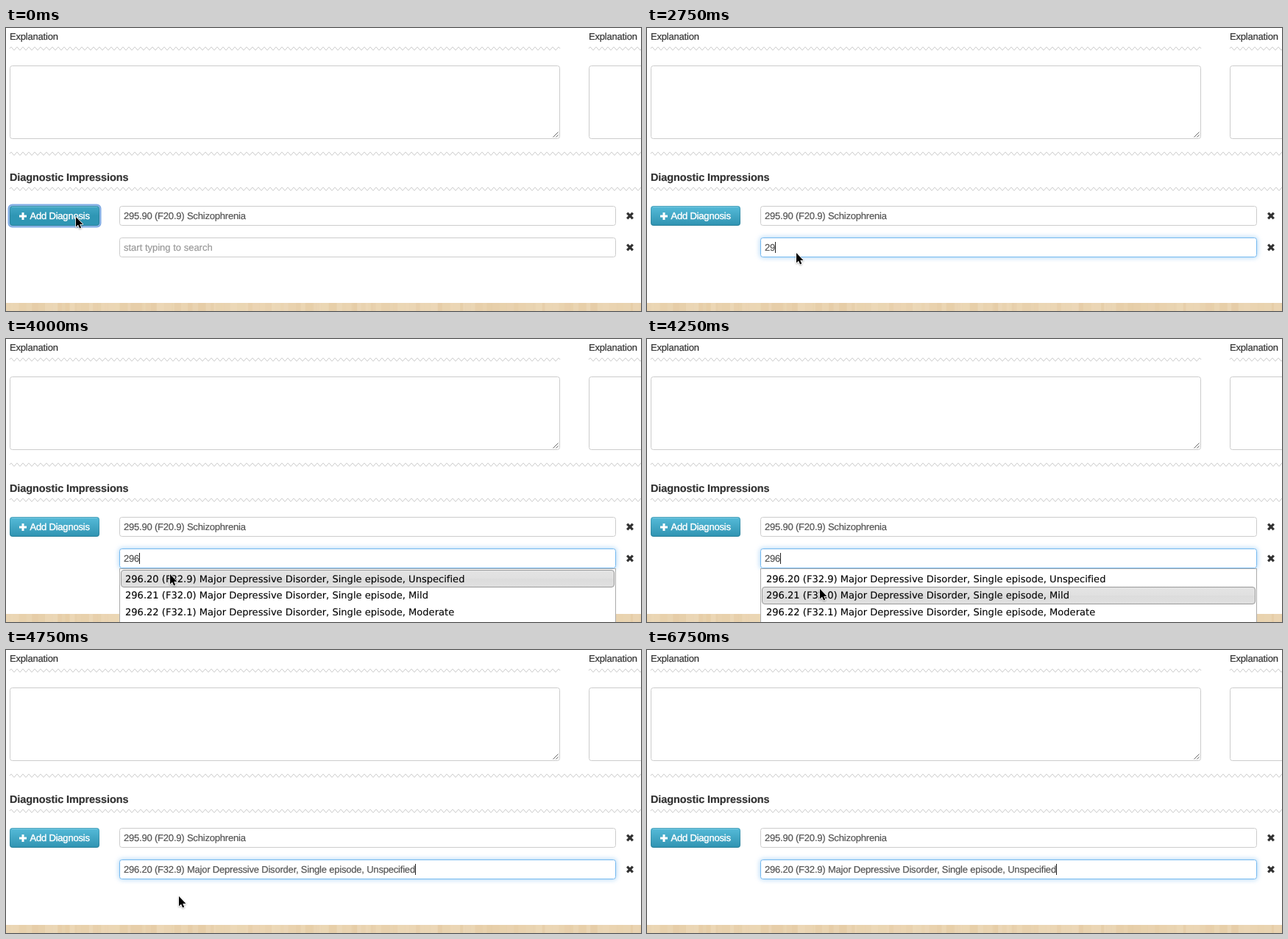
These frames come from a looping animation (863x385 px, 7250 ms). An HTML page:

```html
<!DOCTYPE html>
<html lang="en">
<head>
<meta charset="utf-8">
<title>Diagnosis search</title>
<style>
html, body { margin: 0; width: 100%; height: 100%; overflow: hidden; background: #fff; }
svg { display: block; }
text { font: 13px "Liberation Sans", Arial, sans-serif; letter-spacing: -.2px; fill: #333; stroke: #333; stroke-width: .2px; text-rendering: geometricPrecision; white-space: pre; }
.field { fill: #fff; stroke: #ccc; }
.value { fill: #555; stroke: #555; }
.hint { fill: #999; stroke: #999; letter-spacing: 0; }
.head { font-size: 14.5px; font-weight: bold; letter-spacing: -.1px; }
.label { fill: #fff; stroke: #fff; stroke-width: .4px; }
#list text { font: 13px "DejaVu Sans", Verdana, sans-serif; letter-spacing: .03px; fill: #000; stroke: #000; stroke-width: .1px; }
#glow { fill: #52a8ec; filter: blur(3.5px); }
#cursor { filter: drop-shadow(0 1px 1px rgba(0, 0, 0, .3)); }
</style>
</head>
<body>
<svg width="863" height="385" viewBox="0 0 863 385">
  <defs>
    <linearGradient id="normal" x2="0" y2="1"><stop stop-color="#56bbd9"/><stop offset="1" stop-color="#2f93b1"/></linearGradient>
    <linearGradient id="over" x2="0" y2="1"><stop stop-color="#43a9c7"/><stop offset=".5" stop-color="#2f96b4"/></linearGradient>
    <linearGradient id="pick" x2="0" y2="1"><stop stop-color="#e4e4e4"/><stop offset=".5" stop-color="#e0e0e0"/><stop offset=".5" stop-color="#dcdcdc"/><stop offset="1" stop-color="#e0e0e0"/></linearGradient>
  </defs>
  <g id="wood"><rect y="374" width="863" height="11" fill="#e9d3b0"/></g>
  <path id="waves" fill="none" stroke="#ccc"/>
  <text x="5" y="16">Explanation</text>
  <text x="792" y="16">Explanation</text>
  <rect class="field" x="5.5" y="51.5" width="747" height="99" rx="3"/>
  <rect class="field" x="792.5" y="51.5" width="747" height="99" rx="3"/>
  <path d="M743.5 148.5l7-7M747.5 148.5l3-3" stroke="#666"/>
  <text class="head" x="5" y="208">Diagnostic Impressions</text>

  <rect id="ring" x="3.5" y="240.5" width="125" height="30" rx="5" fill="#a9c8ee" stroke="#7fabe3" stroke-width="2"/>
  <rect id="button" x="5" y="242" width="122" height="27" rx="4"/>
  <rect x="5.5" y="242.5" width="121" height="26" rx="3.5" fill="none" stroke="#000" stroke-opacity=".13"/>
  <path d="M8 243.5h116" stroke="#fff" stroke-opacity=".2"/>
  <path d="M18 256h10M23 251v10" stroke="#fff" stroke-width="3"/>
  <text class="label" x="32.5" y="260">Add Diagnosis</text>

  <rect class="field" x="154.5" y="242.5" width="674" height="26" rx="3"/>
  <text class="value" x="160" y="260">295.90 (F20.9) Schizophrenia</text>
  <rect id="glow" x="154" y="285" width="675" height="27" rx="3"/>
  <rect id="input" class="field" x="154.5" y="285.5" width="674" height="26" rx="3"/>
  <text id="hint" class="hint" x="160" y="303">start typing to search</text>
  <text id="value" class="value" x="160" y="303"></text>
  <rect id="caret" y="291" width="1" height="15" fill="#222"/>
  <path d="M844.2 251.7l7.6 7.6m0-7.6l-7.6 7.6M844.2 294.7l7.6 7.6m0-7.6l-7.6 7.6" stroke="#333" stroke-width="3.3"/>

  <g id="list">
    <rect id="panel" x="154.5" y="312.5" height="120" fill="#fff" stroke="#aaa"/>
    <rect id="mark" x="156.5" width="670" height="23" rx="3.5" fill="url(#pick)" stroke="#999"/>
    <text x="162" y="331"></text>
    <text x="162" y="353"></text>
    <text x="162" y="376"></text>
  </g>
  <path id="cursor" d="M1 2V15.5L4 12.8 6.1 17.4 8.2 16.5 6.2 12H10.4Z" stroke="#fff" stroke-width="1.6" stroke-linejoin="round" paint-order="stroke"/>
</svg>
<script>
const $ = id => document.getElementById(id);
const set = (el, attrs) => { for (const k in attrs) el.setAttribute(k, attrs[k]); };
const show = (el, on) => { el.style.display = on ? '' : 'none'; };

const LOOP = 7250;
const mdd = '(F32.9) Major Depressive Disorder, Single episode, ';
const chosen = '296.20 ' + mdd + 'Unspecified';
const stimulant = 'Stimulant Intoxication, Amphetamine or other stimulant, ';
const lists = {
  drugs: {
    width: 1000,
    rows: [
      '292.89 (F15.229) ' + stimulant + 'without perceptual disturbances, with use disorder',
      '292.89 (F15.222) ' + stimulant + 'with perceptual disturbances, with use disorder',
      '292.89 (F13.929) Sedative, Hypnotic, or Anxiolytic Intoxication, Without use disorder'
    ]
  },
  mood: {
    width: 674,
    rows: [
      chosen,
      '296.21 ' + mdd.replace('2.9', '2.0') + 'Mild',
      '296.22 ' + mdd.replace('2.9', '2.1') + 'Moderate'
    ]
  }
};

// Each step overrides part of the state from its time on.
const steps = [
  [0, { at: [94, 255], over: true, ring: true, glow: 0, text: '', caret: false, list: null, row: -1 }],
  [250, { at: [97, 256] }],
  [500, { at: [197, 297], over: false }],
  [750, { at: [202, 304] }],
  [1000, { ring: false, glow: .75, caret: true }],
  [1250, { glow: 1 }],
  [2000, { caret: false }],
  [2500, { text: '2', caret: true }],
  [2750, { text: '29' }],
  [3000, { list: 'drugs' }],
  [3500, { caret: false }],
  [3750, { text: '296', caret: true }],
  [4000, { list: 'mood', row: 0, at: [222, 318] }],
  [4250, { row: 1, at: [234, 338] }],
  [4500, { row: 0, at: [234, 333] }],
  [4750, { text: chosen, list: null }],
  [5250, { caret: false, at: [284, 334] }],
  [5500, { at: [641, 357] }],
  [5750, { caret: true, at: [790, 315] }],
  [6000, { at: null }],
  [6500, { caret: false }],
  [6750, { caret: true }]
];

const wave = (x, y, end) => `M${x} ${y}q2-4 4 0` + 't4 0'.repeat((end - x) / 4 - 1);
set($('waves'), { d: wave(5, 28, 753) + wave(792, 28, 868) + wave(5, 171, 865) + wave(5, 219, 865) });

// Wood grain: seeded soft vertical streaks.
let seed = 7, grain = '';
const rand = () => (seed = seed * 16807 % 2147483647) / 2147483647;
for (let x = 0; x < 863;) {
  const w = 2 + rand() * 9;
  grain += `<rect x="${x}" y="374" width="${w}" height="11" fill="${rand() < .5 ? '#dfc196' : '#f0dfc2'}" opacity="${rand() * .35}"/>`;
  x += w;
}
$('wood').insertAdjacentHTML('beforeend', grain);

const rows = document.querySelectorAll('#list text');

function draw(s) {
  set($('button'), { fill: s.over ? 'url(#over)' : 'url(#normal)' });
  show($('ring'), s.ring);
  $('glow').style.opacity = .55 * s.glow;
  $('input').style.stroke = s.glow ? '#75b9f0' : '#ccc';
  $('value').textContent = s.text;
  show($('hint'), !s.text);
  show($('caret'), s.caret);
  const end = s.text ? $('value').getComputedTextLength() : 0;
  set($('caret'), { x: Math.round(160 + end), y: s.text ? 291 : 290 });

  show($('list'), s.list);
  if (s.list) {
    const { width, rows: lines } = lists[s.list];
    set($('panel'), { width });
    rows.forEach((el, i) => { el.textContent = lines[i]; });
    show($('mark'), s.row >= 0);
    set($('mark'), { y: 314.5 + 23 * s.row });
  }

  show($('cursor'), s.at);
  if (s.at) set($('cursor'), { transform: `translate(${s.at})` });
}

let last = -1;
function tick() {
  const t = performance.now() % LOOP;
  const past = steps.filter(([from]) => from <= t);
  if (past.length !== last) {
    last = past.length;
    draw(Object.assign({}, ...past.map(step => step[1])));
  }
  requestAnimationFrame(tick);
}
tick();
</script>
</body>
</html>
```
